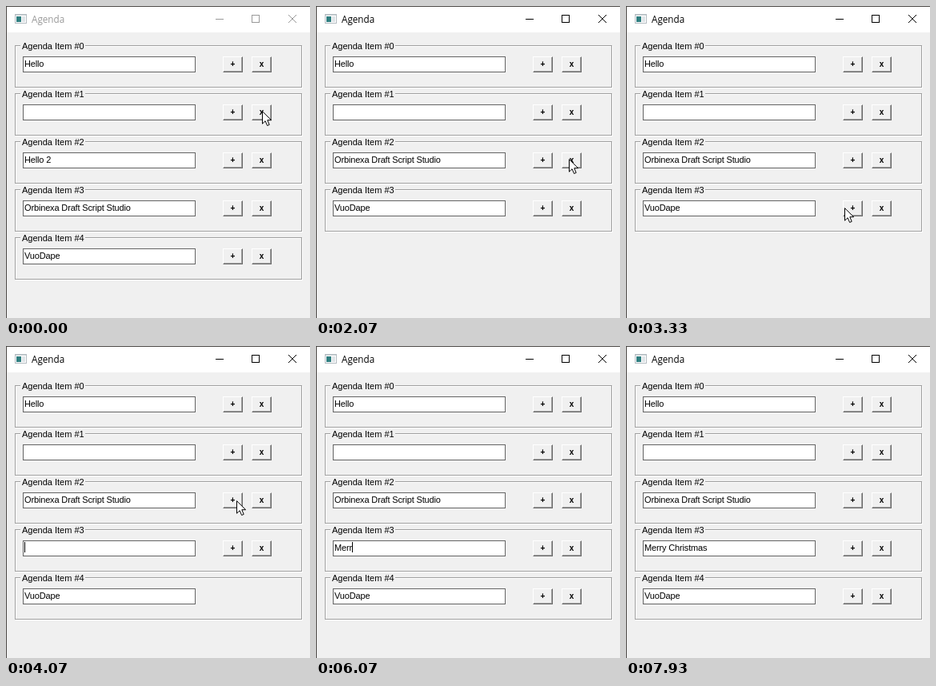
Animation of 380 by 390 pixels, one loop 8 s. Source, as an HTML page:

```html
<!DOCTYPE html>
<html lang="en">
<head>
<meta charset="utf-8">
<title>Agenda</title>
<style>
  html, body { margin: 0; width: 100%; height: 100%; overflow: hidden; }
  body { background: #f0f0f0; }
  #win { position: relative; width: 380px; height: 390px; overflow: hidden; background: #f0f0f0; cursor: default; }
  #win * { position: absolute; box-sizing: border-box; white-space: pre; }
  #edge { inset: 0; border: solid #4c4846; border-width: 1px 0 0 1px; }
  #bar { left: 1px; top: 1px; width: 379px; height: 32px; background: #fff; color: #000; }
  #bar.idle { color: #999; }
  #title { left: 31px; top: 7px; font: 11.7px/17px "Open Sans", "Noto Sans", sans-serif; }
  #bar svg, #pointers { left: 0; top: 0; }
  .group { left: 11px; width: 359px; height: 53px; border: 1px solid #a0a0a0; box-shadow: 1px 1px 0 #fff; }
  .group i { inset: 0; border: solid #fff; border-width: 1px 0 0 1px; }
  .label, .edit { font: 11px/14px "Liberation Sans", Arial, sans-serif; color: #000; }
  .label { left: 6px; top: -7px; padding: 0 1px 0 2px; background: #f0f0f0; }
  .edit { left: 9px; top: 13px; width: 216px; height: 20px; border: 1px solid #646464; background: #fff; letter-spacing: -.15px; }
  .edit span { left: 1px; top: 1px; }
  .caret { left: 100%; top: 0; width: 1px; height: 13px; background: #000; }
  .btn { top: 13px; width: 25px; height: 20px; border: 1px solid; border-color: #fff #696969 #696969 #fff;
    box-shadow: inset -1px -1px 0 #a0a0a0; background: #f0f0f0; text-align: center;
    font: bold 10px/18px "Liberation Sans", Arial, sans-serif; color: #000; }
  .add { left: 259px; }
  .del { left: 295px; }
</style>
</head>
<body>
<div id="win">
  <div id="bar">
    <svg width="379" height="32" shape-rendering="crispEdges">
      <g transform="translate(10 9)">
        <rect x=".5" y=".5" width="14" height="11" fill="#fff" stroke="#b4bcc1"/>
        <rect x="1" y="1" width="13" height="1" fill="#ccd3d7"/>
        <rect x="2" y="3" width="6" height="7" fill="#2f7f80"/>
        <rect x="9" y="3" width="4" height="7" fill="#dfe4e7"/>
      </g>
      <g fill="none" stroke="currentColor">
        <path d="M261 15.5h10M306.5 10.5h9v9h-9z"/>
        <path d="M352 10l10 10M362 10l-10 10" shape-rendering="auto"/>
      </g>
    </svg>
    <div id="title">Agenda</div>
  </div>
  <div id="rows"></div>
  <div id="edge"></div>
  <svg id="pointers" width="380" height="390">
    <path id="arrow" d="M-.5 .7V16.2L3.1 12.7 5.6 18.5 8.2 17.4 5.8 11.7H10.6Z" fill="#fff" stroke="#000"/>
    <path id="beam" d="M-3 .5H-1M1 .5H3M-3 16.5H-1M1 16.5H3M.5 1V16" fill="none" stroke="#000" shape-rendering="crispEdges"/>
  </svg>
</div>
<script>
  const LOOP = 8000, REMOVE = 1930, INSERT = 3870, LAST_BOX = 3935, LAST_BUTTONS = 4130;
  const ACTIVATE = 1800, TYPING = 5730, BLINK = 530;
  const APP = "Orbinexa Draft Script Studio", SITE = "VuoDape";
  const $ = id => document.getElementById(id);

  // [time, x, y]
  const path = [
    [200, 321, 131], [600, 323, 165], [1000, 319, 189], [1070, 319, 189], [1270, 317, 191],
    [2270, 317, 191], [2670, 308, 110], [3070, 279, 238], [3200, 279, 238], [3330, 274, 252],
    [3430, 276, 266], [3670, 289, 193], [4130, 289, 193], [4670, 154, 245]
  ];
  // [time, characters typed]
  const keys = [
    [5730, 1], [5870, 2], [6000, 3], [6070, 4], [6200, 5], [6270, 6], [6600, 7],
    [6870, 8], [6970, 9], [7070, 10], [7170, 11], [7270, 12], [7370, 14], [7470, 15]
  ];

  function el(cls, parent, text = "") {
    const e = document.createElement("div");
    e.className = cls;
    e.textContent = text;
    return parent.appendChild(e);
  }

  const rows = Array.from({ length: 5 }, (_, i) => {
    const box = el("group", $("rows"));
    box.style.top = 49 + 60 * i + "px";
    box.appendChild(document.createElement("i"));
    el("label", box, "Agenda Item #" + i);
    const edit = el("edit", box);
    const text = edit.appendChild(document.createElement("span"));
    return { box, edit, text, buttons: [el("btn add", box, "+"), el("btn del", box, "x")] };
  });
  const holder = rows[3].edit.appendChild(document.createElement("span"));
  const typed = document.createTextNode("");
  holder.append(typed);
  const caret = el("caret", holder);

  const show = (e, on) => { e.style.visibility = on ? "inherit" : "hidden"; };

  function pointerAt(t) {
    const n = path.findIndex(p => p[0] > t);
    if (n < 1) return (n ? path[path.length - 1] : path[0]).slice(1);
    const [t0, x0, y0] = path[n - 1], [t1, x1, y1] = path[n];
    const u = (t - t0) / (t1 - t0), k = u * u * (3 - 2 * u);
    return [Math.round(x0 + (x1 - x0) * k), Math.round(y0 + (y1 - y0) * k)];
  }

  function itemsAt(t) {
    if (t < REMOVE) return ["Hello", "", "Hello 2", APP, SITE];
    if (t < INSERT) return ["Hello", "", APP, SITE];
    return t < LAST_BOX ? ["Hello", "", APP, ""] : ["Hello", "", APP, "", SITE];
  }

  function caretOn(t) {
    if (t < INSERT) return false;
    if (t >= TYPING) return t < 7930;
    return t < 5400 && Math.floor((t - INSERT) / BLINK) % 2 === 0;
  }

  function draw(t) {
    $("bar").className = t < ACTIVATE ? "idle" : "";

    const items = itemsAt(t);
    rows.forEach((r, i) => {
      show(r.box, i < items.length);
      r.text.textContent = items[i] || "";
      const ready = i < items.length && (i < 4 || t < REMOVE || t >= LAST_BUTTONS);
      r.buttons.forEach(b => show(b, ready));
    });

    const last = keys.filter(k => k[0] <= t).pop();
    typed.data = "Merry Christmas".slice(0, last ? last[1] : 0);
    show(caret, caretOn(t));

    const [x, y] = pointerAt(t);
    const inEdit = t > INSERT && x < 237 && y > 232;
    const move = `translate(${x} ${y})`;
    $("arrow").setAttribute("transform", move);
    $("beam").setAttribute("transform", move);
    show($("arrow"), t < TYPING && !inEdit);
    show($("beam"), t < TYPING && inEdit);
  }

  const start = performance.now();
  function tick() {
    draw((performance.now() - start) % LOOP);
    requestAnimationFrame(tick);
  }
  draw(0);
  requestAnimationFrame(tick);
</script>
</body>
</html>
```
